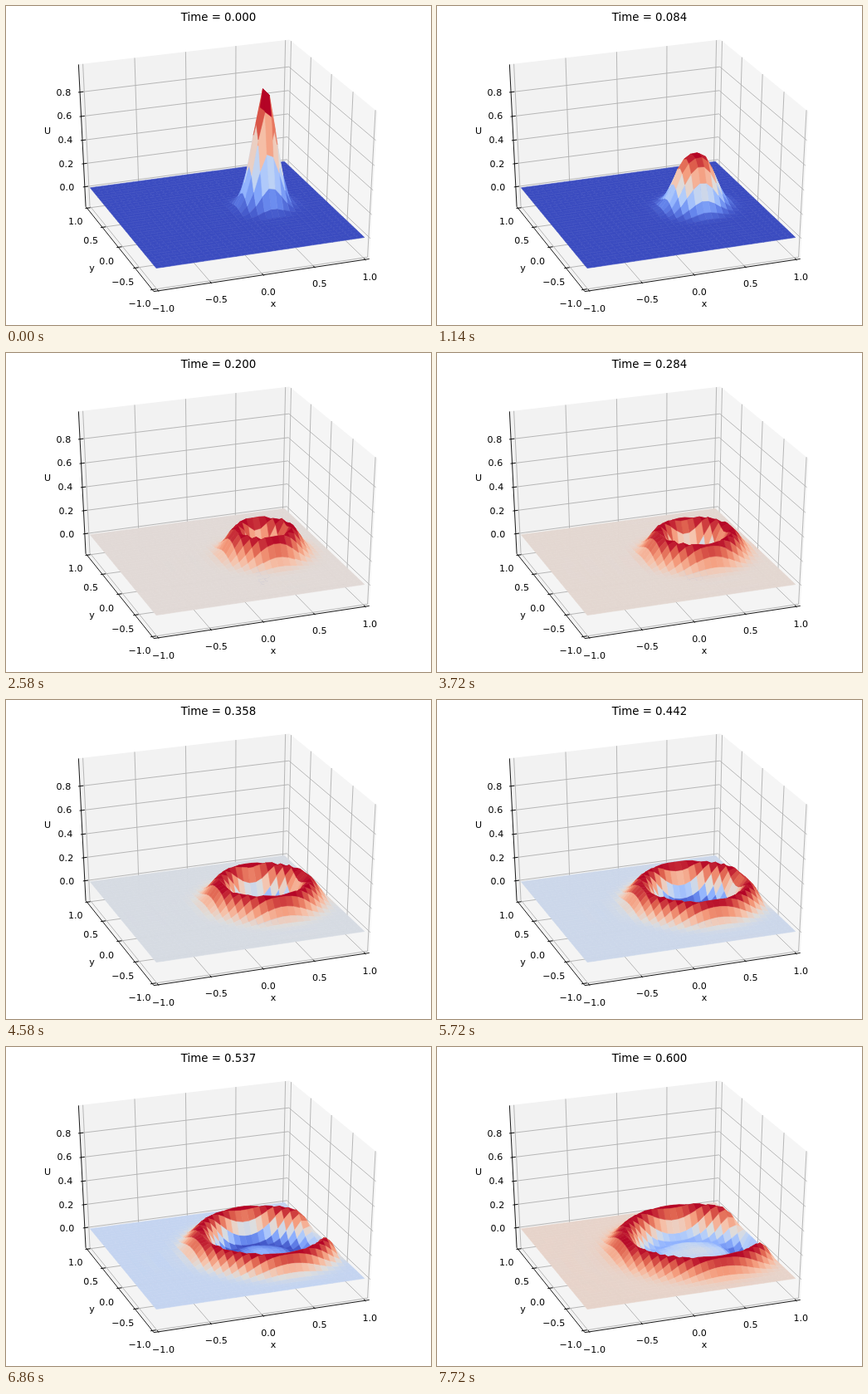
An HTML page with a canvas for the animation above (8000 ms loop, 512 by 384 pixels).

```html
<!DOCTYPE html>
<html lang="en">
<head>
<meta charset="utf-8">
<title>Wave surface</title>
<style>
  html, body { margin: 0; width: 100%; height: 100%; overflow: hidden; background: #fff; }
  svg, canvas { position: absolute; left: 0; top: 0; width: 512px; height: 384px; }
  text { font: 11.1px "DejaVu Sans", Verdana, sans-serif; text-anchor: middle; fill: #000; }
  #title { font-size: 13.33px; }
  .grid { stroke: #b0b0b0; stroke-width: .9; fill: none; }
  .axis { stroke: #000; stroke-width: .9; fill: none; }
</style>
</head>
<body>
<svg id="axes" viewBox="0 0 512 384"></svg>
<canvas id="surface" width="512" height="384"></canvas>
<svg viewBox="0 0 512 384"><text id="title" x="256" y="18">Time = 0.000</text></svg>
<script>
const LOOP = 8000, FRAMES = 28, STEPS = 57;
const N = 24, DT = 0.2 / 19, CELLS = 32, SHARP = 45;
const Z_LOW = -0.15, Z_HIGH = 1;

// ---- projection: unit cube seen from elevation 30, azimuth 250 ----
const ELEV = Math.PI / 6, AZIM = 250 * Math.PI / 180;
const sinE = Math.sin(ELEV), cosE = Math.cos(ELEV);
const sinA = Math.sin(AZIM), cosA = Math.cos(AZIM);

function project(x, y, z) {
  const along = x * cosA + y * sinA;
  const right = y * cosA - x * sinA;
  const up = z * cosE - along * sinE;
  const depth = along * cosE + z * sinE;
  return [262.4 + 2624 * right / (10 - depth), 187.3 - 1929 * up / (10 - depth), depth];
}
const zWorld = z => (z - Z_LOW) / (Z_HIGH - Z_LOW) - 0.5;

// ---- axes ----
const axes = document.getElementById('axes');
const B = 0.5 + 1 / 48;

function add(tag, attrs, label) {
  const el = document.createElementNS('http://www.w3.org/2000/svg', tag);
  for (const k in attrs) el.setAttribute(k, attrs[k]);
  if (label) el.textContent = label;
  axes.append(el);
}
const points = list => list.map(p => project(...p).slice(0, 2).map(v => v.toFixed(2)).join()).join(' ');
const pane = (fill, ...list) => add('polygon', { points: points(list), fill });
const line = (cls, ...list) => add('polyline', { points: points(list), class: cls });
const label = (s, x, y) => add('text', { x, y }, s);
const num = v => (v < 0 ? '\u2212' : '') + Math.abs(v).toFixed(1);

function drawAxes() {
  pane('#f5f5f5', [B, -B, -B], [B, B, -B], [B, B, B], [B, -B, B]);
  pane('#f2f2f2', [-B, B, -B], [B, B, -B], [B, B, B], [-B, B, B]);
  pane('#f4f4f4', [-B, -B, -B], [B, -B, -B], [B, B, -B], [-B, B, -B]);

  const ticks = [-1, -0.5, 0, 0.5, 1], heights = [0, 0.2, 0.4, 0.6, 0.8];
  for (const t of ticks) {
    line('grid', [t / 2, -B, -B], [t / 2, B, -B], [t / 2, B, B]);
    line('grid', [-B, t / 2, -B], [B, t / 2, -B], [B, t / 2, B]);
  }
  for (const h of heights) {
    const w = zWorld(h);
    line('grid', [-B, B, w], [B, B, w], [B, -B, w]);
  }

  line('axis', [-B, -B, -B], [B, -B, -B]);
  line('axis', [-B, -B, -B], [-B, B, -B]);
  line('axis', [-B, B, -B], [-B, B, B]);

  const out = -B - 0.0085, inn = -B + 0.017;
  ticks.forEach((t, i) => {
    line('axis', [t / 2, out, -B], [t / 2, inn, -B]);
    line('axis', [out, t / 2, -B], [inn, t / 2, -B]);
    label(num(t), 189.5 + 64.4 * i - 0.55 * i * i, 368 - 10.9 * i + 0.35 * i * i);
    label(num(t), 161 - 20.5 * i + 0.3 * i * i, 362 - 26.3 * i + 0.37 * i * i);
  });
  heights.forEach((h, i) => {
    line('axis', [out, B, zWorld(h)], [inn, B, zWorld(h)]);
    label(num(h), 73.4 - i, 222.2 - 28.6 * i);
  });
  label('x', 322, 362);
  label('y', 103.6, 318.5);
  label('U', 50, 154);
}

// ---- wave equation on a Chebyshev grid, leapfrog in time ----
const table = (rows, cols, f) =>
  Array.from({ length: rows }, (_, i) => Array.from({ length: cols }, (_, j) => f(i, j)));
const mul = (a, b) => table(a.length, b[0].length, (i, j) => {
  let s = 0;
  for (let k = 0; k < b.length; k++) s += a[i][k] * b[k][j];
  return s;
});
const flip = a => table(a[0].length, a.length, (i, j) => a[j][i]);

const node = Array.from({ length: N + 1 }, (_, j) => -Math.cos(Math.PI * j / N));
const edge = j => j === 0 || j === N;

function secondDerivative() {
  const c = j => (edge(j) ? 2 : 1) * (j % 2 ? -1 : 1);
  const d = table(N + 1, N + 1, (i, j) => i === j ? 0 : c(i) / c(j) / (node[i] - node[j]));
  d.forEach((row, i) => { row[i] = -row.reduce((a, b) => a + b, 0); });
  return mul(d, d);
}

// natural cubic spline through the nodes, sampled on the even grid
function spline(v) {
  const h = i => node[i + 1] - node[i];
  const slope = i => (v[i + 1] - v[i]) / h(i);
  const c = [0], m = [0];
  for (let i = 1; i < N; i++) {
    const p = 2 * (h(i - 1) + h(i)) - h(i - 1) * c[i - 1];
    c[i] = h(i) / p;
    m[i] = (6 * (slope(i) - slope(i - 1)) - h(i - 1) * m[i - 1]) / p;
  }
  m[N] = 0;
  for (let i = N - 1; i > 0; i--) m[i] -= c[i] * m[i + 1];

  return Array.from({ length: CELLS + 1 }, (_, k) => {
    const x = -1 + 2 * k / CELLS;
    let i = 0;
    while (i < N - 1 && node[i + 1] < x) i++;
    const b = (x - node[i]) / h(i), a = 1 - b;
    return a * v[i] + b * v[i + 1]
      + ((a ** 3 - a) * m[i] + (b ** 3 - b) * m[i + 1]) * h(i) ** 2 / 6;
  });
}

function solve() {
  const d2 = secondDerivative(), d2t = flip(d2);
  const pt = table(N + 1, N + 1, (i, j) => (i === j ? 1 : 0)).map(spline), p = flip(pt);
  let u = table(N + 1, N + 1, (i, j) =>
    Math.exp(-SHARP * ((node[i] - 0.4) ** 2 + node[j] ** 2)));
  let old = u;
  const result = [];
  for (let n = 0; n <= STEPS; n++) {
    result.push(mul(mul(p, u), pt));
    const xx = mul(d2, u), yy = mul(u, d2t);
    const next = table(N + 1, N + 1, (i, j) => edge(i) || edge(j)
      ? u[i][j]
      : 2 * u[i][j] - old[i][j] + DT * DT * (xx[i][j] + yy[i][j]));
    old = u;
    u = next;
  }
  return result;
}

// ---- surface ----
const RAMP = [
  [59, 76, 192], [98, 130, 234], [141, 176, 254], [184, 208, 249], [221, 221, 221],
  [245, 196, 173], [244, 154, 123], [222, 96, 77], [180, 4, 38]
];
function colour(v) {
  const s = Math.min(Math.max(v, 0), 1) * (RAMP.length - 1);
  const i = Math.min(Math.floor(s), RAMP.length - 2);
  const rgb = RAMP[i].map((a, k) => Math.round(a + (RAMP[i + 1][k] - a) * (s - i)));
  return `rgb(${rgb})`;
}

const ctx = document.getElementById('surface').getContext('2d');
const title = document.getElementById('title');
ctx.lineWidth = 0.6;
ctx.lineJoin = 'round';

function drawSurface(u) {
  const pts = table(CELLS + 1, CELLS + 1, (i, j) =>
    project(i / CELLS - 0.5, j / CELLS - 0.5, zWorld(u[i][j])));
  const quads = [];
  let low = Infinity, high = -Infinity;
  for (let i = 0; i < CELLS; i++) {
    for (let j = 0; j < CELLS; j++) {
      const mean = (u[i][j] + u[i + 1][j] + u[i + 1][j + 1] + u[i][j + 1]) / 4;
      const q = [pts[i][j], pts[i + 1][j], pts[i + 1][j + 1], pts[i][j + 1]];
      quads.push({ q, mean, depth: q.reduce((s, p) => s + p[2], 0) });
      low = Math.min(low, mean);
      high = Math.max(high, mean);
    }
  }
  quads.sort((a, b) => a.depth - b.depth);
  ctx.clearRect(0, 0, 512, 384);
  for (const { q, mean } of quads) {
    ctx.fillStyle = ctx.strokeStyle = colour((mean - low) / (high - low));
    ctx.beginPath();
    q.forEach(p => ctx.lineTo(p[0], p[1]));
    ctx.closePath();
    ctx.fill();
    ctx.stroke();
  }
}

// ---- playback ----
const states = solve();
const starts = Array.from({ length: FRAMES }, (_, i) => Math.round(i * LOOP / FRAMES / 20) * 20);
let shown = -1;

function show(time) {
  const t = time % LOOP;
  let i = FRAMES - 1;
  while (starts[i] > t) i--;
  if (i === shown) return;
  shown = i;
  const step = Math.round(i * STEPS / (FRAMES - 1));
  title.textContent = 'Time = ' + (step * DT).toFixed(3);
  drawSurface(states[step]);
}

drawAxes();
show(0);
const begin = performance.now();
function tick() {
  show(Math.max(0, performance.now() - begin));
  requestAnimationFrame(tick);
}
requestAnimationFrame(tick);
</script>
</body>
</html>
```
